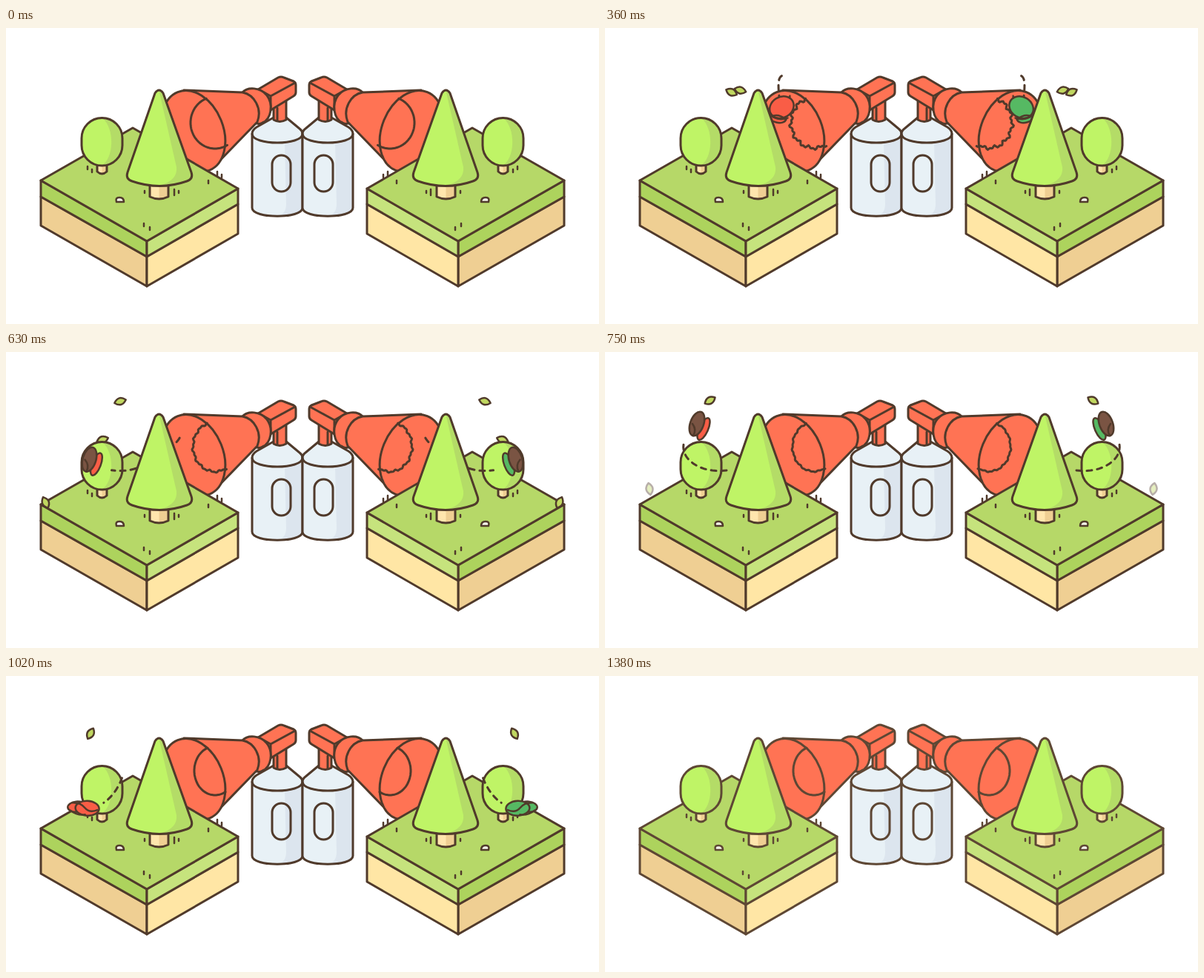
These frames come from a looping animation (800x400 px, 2840 ms). An HTML page:

```html
<!DOCTYPE html>
<html lang="en">
<head>
<meta charset="utf-8">
<title>Spray horns</title>
<style>
  html, body { margin: 0; width: 100%; height: 100%; overflow: hidden; background: #fff; }
  svg { display: block; width: 100vw; height: 100vh; }
  .ink { stroke: var(--line); stroke-width: 3; stroke-linejoin: round; stroke-linecap: round; }
  .none { fill: none; }
  .red { fill: #ff7354; }
  .leaf { fill: #bff466; }
  .shade { fill: #b4dc67; }
  .trunk { fill: #ffe6ad; }
  .bark { fill: #efcf93; }
  .glass { fill: #e8f1f6; }
  .dim { fill: #dce5ee; }
  .thin { stroke-width: 2.5; }
  .trail { stroke-dasharray: 7 7; }
</style>
</head>
<body>
<svg id="stage" viewBox="0 0 800 400"></svg>
<script>
const LOOP = 2840, STEP = 30, ACTIVE = 1380;
const stage = document.getElementById('stage');

const path = (d, cls, extra = '') => `<path d="${d}" class="${cls}" ${extra}/>`;
const oval = (x, y, rx, ry, rot, cls, extra = '') =>
  `<ellipse rx="${rx}" ry="${ry}" transform="translate(${x} ${y}) rotate(${rot})" class="${cls}" ${extra}/>`;

const BODY = 'M332 143V243C332 258 400 258 400 243V143Q400 139 396 136L378 121H361L338 134Q332 138 332 143Z';
const CONE = 'M201 88Q206.500 80 212 88L250 195Q253 204 244 207Q207 220 170 207Q161 204 164 195Z';
const BALL = 'M102 149a27.500 27.500 0 0 1 55 0v9.500a27.500 27.500 0 0 1-55 0Z';

// Shading always falls on the right, also in the mirrored half.
const shadeOf = (d, cx, flip, cls) =>
  path(d, cls, flip ? `transform="translate(${2 * cx}) scale(-1 1)"` : '');

function bottle(flip) {
  return path(BODY, 'glass') +
    shadeOf('M376 154Q392 152 400 143V243Q398 252 366 254Q378 252 378 238Z', 366, flip, 'dim') +
    path(BODY, 'ink none') +
    path('M332 143C332 159 400 159 400 143', 'ink none') +
    '<rect x="359" y="172" width="25" height="49" rx="12.5" class="ink none"/>';
}

function horn() {
  return path('M361 98H378V124Q369 129 361 124Z', 'ink red') +
    path('M366 108V125', 'ink none') +
    path('M340 83L367 67Q371 65 375 67L388 72Q391 74 391 77V87Q391 90 388 92L357 111Z', 'ink red') +
    path('M341 83L357 92L390 74M357 92V108', 'ink none') +
    path('M319 87C326 79 343 80 352 91C361 103 358 123 346 128Q341 131 336 128Z', 'ink red') +
    path('M240 84L319 87C335 90 346 109 339 127L278 190Z', 'ink red') +
    oval(253, 139.5, 57, 40, 68, 'ink red') +
    '<path class="ink none hole"/>';
}

function block() {
  return path('M47 228V267L190 349V309Z', 'ink bark') +
    path('M190 309V349L313 278V238Z', 'ink', 'fill="#ffe6a5"') +
    path('M47 206V228L190 309V288Z', 'ink', 'fill="#add35d"') +
    path('M190 288V309L313 238V217Z', 'ink', 'fill="#c6e37d"') +
    path('M47 206L171 135L313 217L190 288Z', 'ink', 'fill="#b6d868"') +
    path('M110 187v4M116 191v4M187 220v3M227 218v8M233 220v3M273 206v4M186 264v4M194 269v4M285 194v6M291 198v4',
      'ink none thin') +
    path('M149 235Q147 229 153 229Q159 229 159 235Z', 'ink thin', 'fill="#f3f3ea"');
}

function tree(shape, shadow, trunk, cx, flip) {
  const [top, bottom, half] = trunk;
  const wood = `M${cx - half} ${top}V${bottom - 3}Q${cx} ${bottom + 3} ${cx + half} ${bottom - 3}V${top}Z`;
  return path(wood, 'trunk') +
    shadeOf(`M${cx} ${top}V${bottom}L${cx + half} ${bottom - 3}V${top}Z`, cx, flip, 'bark') +
    path(wood, 'ink none') + path(shape, 'leaf') +
    shadeOf(shadow, cx, flip, 'shade') + path(shape, 'ink none');
}

const ballTree = flip => tree(BALL,
  'M130 121.500A27.500 27.500 0 0 1 157 149V158A27.500 27.500 0 0 1 129 186C146 176 147 136 130 121.500Z',
  [182, 197, 6.5], 129.5, flip);

const coneTree = flip => tree(CONE,
  'M206.500 85Q210 85 212 88L250 195Q253 204 244 207Q228 213 207 213Q232 206 230 188Z',
  [208, 231, 12.5], 206.5, flip);

function flyer(color) {
  const fill = `fill="${color}"`, dark = 'fill="#7a5443"';
  return '<g class="flyer">' +
    `<g>${oval(-3, 10, 12, 7, 10, 'ink thin', fill)}${oval(2, -4, 17, 14, -35, 'ink thin', fill)}` +
      `${path('M-15 5Q-5 16 11 10M-14 11Q-4 3 9 12M12 -17V-20', 'ink none thin')}</g>` +
    `<g>${oval(6, 4, 6, 16, 24, 'ink thin', fill)}${oval(-3, -3, 9, 17, 20, 'ink thin', dark)}` +
      `${path('M-8 13Q-3 5 -9 -3', 'ink none thin')}</g>` +
    `<g>${oval(-9, -3, 12, 7, 2, 'ink thin', fill)}${oval(5, 1, 16, 10, 10, 'ink thin', fill)}` +
      `${path('M-14 -9Q-3 -8 2 0T18 5M-18 1Q-10 9 1 9', 'ink none thin')}</g></g>`;
}

function half(flip, color) {
  const leaf = path('M-8 0Q0 -9 8 0Q0 9 -8 0Z', 'ink thin sprig', 'fill="#c0d760"');
  return `<g ${flip ? 'transform="translate(800) scale(-1 1)"' : ''}>` +
    bottle(flip) + horn() + block() +
    `<path class="ink none trail"/><g class="back">${leaf.repeat(3)}${flyer(color)}</g>` +
    ballTree(flip) + coneTree(flip) +
    '<path class="ink none trail"/><g class="front"></g></g>';
}

stage.innerHTML = half(false, '#f95d46') + half(true, '#56b963');
const halves = [...stage.children].map(g => ({
  hole: g.querySelector('.hole'),
  trails: g.querySelectorAll('.trail'),
  sprigs: g.querySelectorAll('.sprig'),
  flyer: g.querySelector('.flyer'),
  back: g.querySelector('.back'),
  front: g.querySelector('.front')
}));

const clamp = v => Math.max(0, Math.min(1, v));
const mix = (a, b, u) => a + (b - a) * u;

// Evenly timed knots of the flight: x, y and velocity per leg.
const LEG = 255, LEAD = 15;
const knots = [
  [272, 140, 20, -150], [234, 77, 0, 110], [195, 148, -170, 110],
  [127, 100, 170, -100], [113, 178, -150, 10], [39, 168, -30, -8], [15, 160, -20, -8]
];

function flight(t) {
  const leg = (t + LEAD) / LEG, i = Math.min(Math.floor(leg), knots.length - 2), u = leg - i;
  const a = knots[i], b = knots[i + 1], s = u * u * (3 - 2 * u);
  return [0, 1].map(k =>
    mix(a[k], b[k], s) + u * (1 - u) * ((1 - u) * a[k + 2] - u * b[k + 2]));
}

// Each leaf follows a quadratic curve while it turns, then fades.
const leaves = [
  { begin: 150, end: 1260, curve: [[205, 112], [145, 22], [90, 106]], turn: [40, -90] },
  { begin: 150, end: 700, curve: [[203, 118], [160, 45], [120, 140]], turn: [60, -30] },
  { begin: 240, end: 750, curve: [[200, 140], [20, 243], [60, 185]], turn: [20, 80] }
];

function drift({ begin, end, curve: [a, b, c], turn }, t) {
  const s = (t - begin) / (end - begin);
  const [x, y] = [0, 1].map(k => mix(mix(a[k], b[k], s), mix(b[k], c[k], s), s));
  return {
    pose: `translate(${x} ${y}) rotate(${mix(...turn, s)})`,
    alpha: s < 0 ? 0 : clamp((1.08 - s) / .2)
  };
}

function polyline(from, to, step, point) {
  let d = '';
  for (let s = from; s <= to; s += step) d += (d ? 'L' : 'M') + point(s).map(v => v.toFixed(1)).join(' ');
  return d;
}

function holePath(t) {
  const u = clamp(t / 960), grow = 1 - u, jag = 1.6 * Math.sin(Math.PI * Math.sqrt(u));
  return polyline(60, 250, 3, deg => {
    const q = deg * Math.PI / 180;
    const r = jag * (Math.sin(13 * q) + .8 * Math.sin(29 * q + 2));
    return [282 + (28 + 5 * grow + r) * Math.cos(q), 128 + (33 + 2 * grow + r) * Math.sin(q)];
  });
}

const trail = (from, to) => polyline(from, to, 10, flight);

// Stretches of the flight that pass behind the trees.
const COVER = 525, HIDE = 790, SHOW = 900;

function draw(time) {
  const t = Math.floor(time / STEP) * STEP, rest = t >= ACTIVE;
  stage.style.setProperty('--line', rest ? '#5e4734' : '#503a2b');

  const hole = holePath(t);
  const start = Math.max(190, 1.3 * t - 434), end = rest ? 0 : t - 50;
  const trails = [
    trail(start, Math.min(end, COVER)),
    trail(Math.max(start, COVER), Math.min(end, HIDE)) + trail(Math.max(start, SHOW), end)
  ];

  const [x, y] = flight(Math.min(t, ACTIVE));
  const behind = t < COVER || (t >= HIDE && t < SHOW);
  const pose = Math.max(0, Math.min(2, Math.round((t - 240) / (2 * LEG))));
  const spin = (t - 240 - 2 * LEG * pose) * .03;
  const size = mix(.35, 1, clamp((t - 60) / 150));
  const alpha = rest || t < 60 ? 0 : 1 - .8 * clamp((t - 1270) / 110);

  for (const h of halves) {
    h.hole.setAttribute('d', hole);
    h.trails.forEach((el, i) => el.setAttribute('d', trails[i]));
    const layer = behind ? h.back : h.front;
    if (h.flyer.parentNode !== layer) layer.appendChild(h.flyer);
    h.flyer.setAttribute('transform', `translate(${x} ${y}) rotate(${spin}) scale(${size})`);
    h.flyer.setAttribute('opacity', alpha);
    [...h.flyer.children].forEach((g, i) => g.setAttribute('display', i === pose ? 'inline' : 'none'));
    h.sprigs.forEach((el, i) => {
      const leaf = drift(leaves[i], t);
      el.setAttribute('transform', leaf.pose);
      el.setAttribute('opacity', leaf.alpha);
    });
  }
}

const origin = performance.now();
function tick() {
  draw((performance.now() - origin) % LOOP);
  requestAnimationFrame(tick);
}
tick();
</script>
</body>
</html>
```
